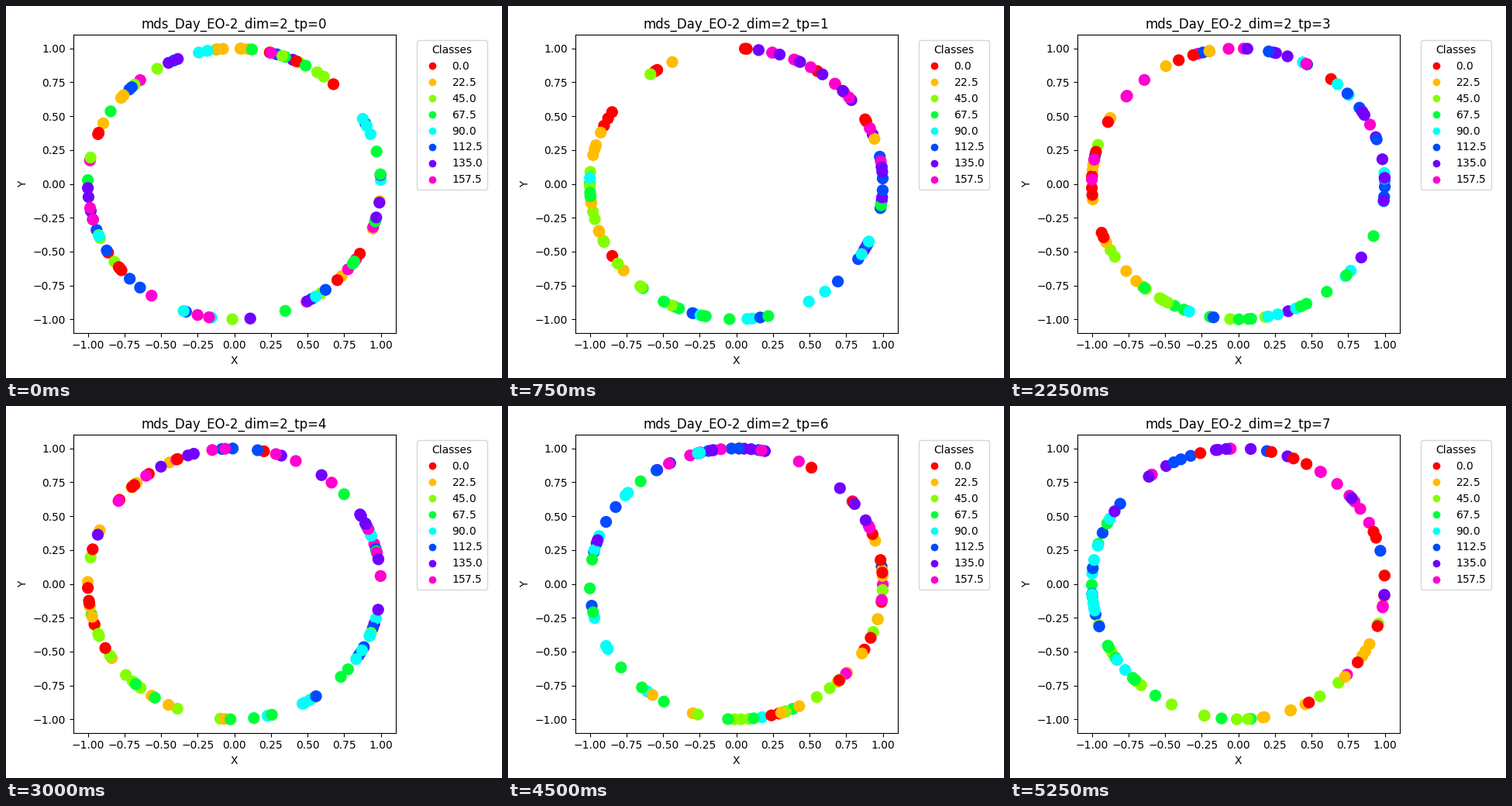
These frames come from a looping animation (640x480 px, 6 s). A matplotlib script:

```python
import numpy as np
import matplotlib.pyplot as plt
from matplotlib.animation import FuncAnimation

CLASSES, TRIALS = 8, 12
STEP = 180 / CLASSES

# One entry per time point: angle of the first class, direction in which the
# classes follow one another round the circle, spread (all in degrees).
POSES = [(0, 1, 120), (110, 1, 50), (130, 1, 48), (150, 1, 46),
         (150, 1, 48), (145, 1, 50), (0, -1, 50), (5, -1, 50)]

# Trials are painted in mixed order, so no class lies on top.
kinds = np.random.default_rng(1).permutation(
    np.repeat(np.arange(CLASSES), TRIALS))


def positions(i):
    """Scatter every trial about its class's place on the unit circle."""
    start, turn, spread = POSES[i]
    noise = np.random.default_rng(i).normal(0, spread, len(kinds))
    angles = np.radians(start + turn * kinds * 360 / CLASSES + noise)
    return np.column_stack([np.cos(angles), np.sin(angles)])


def update(i):
    dots.set_offsets(positions(i))
    ax.set_title(f"mds_Day_EO-2_dim=2_tp={i}")
    return dots,


fig, ax = plt.subplots(figsize=(6.4, 4.8), dpi=100)
dots = ax.scatter(*positions(0).T, c=kinds * STEP, s=100,
                  cmap="hsv", vmin=0, vmax=180)
ax.set(xlabel="X", ylabel="Y", xlim=(-1.1, 1.1), ylim=(-1.1, 1.1))
ax.legend(*dots.legend_elements(), title="Classes",
          bbox_to_anchor=(1.05, 1), loc="upper left")
update(0)
fig.tight_layout()

anim = FuncAnimation(fig, update, frames=len(POSES), interval=750,
                     init_func=lambda: update(0), repeat=True, repeat_delay=0)
plt.show()
```
